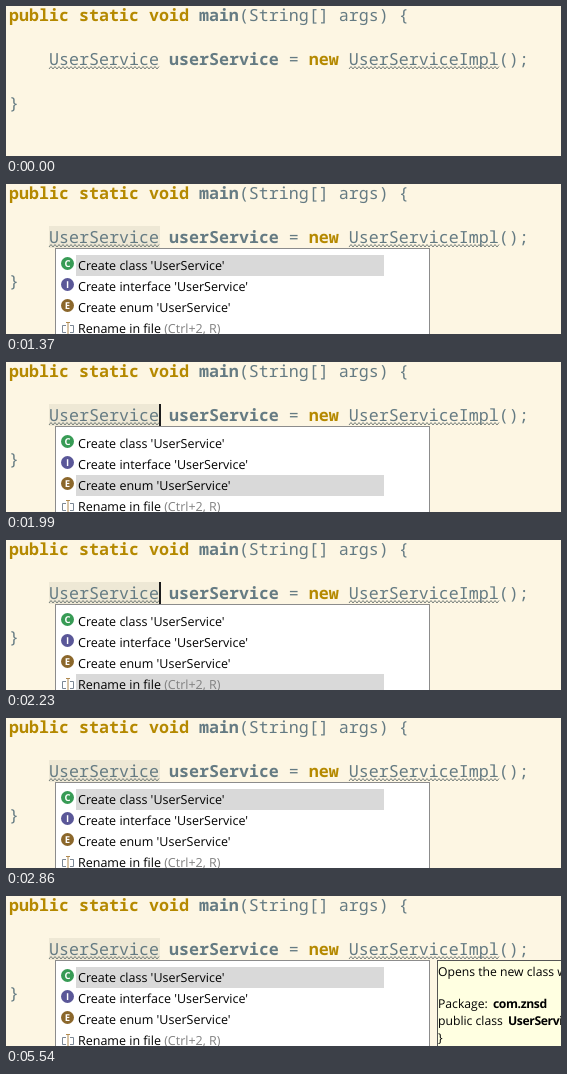
These frames come from a looping animation (555 by 150 pixels, 5.7 s). An HTML page:

```html
<!DOCTYPE html>
<html lang="en">
<head>
<meta charset="utf-8">
<title>Quick fix popup</title>
<style>
  html, body { margin: 0; width: 100%; height: 100%; overflow: hidden; background: #fdf6e3; }
  svg { display: block; }
  text { white-space: pre; text-rendering: geometricPrecision; }
  .code { font: 16.667px "Noto Sans Mono", monospace; fill: #657b83; }
  .code .b { font-weight: 700; }
  .code .k { font-weight: 700; fill: #b58900; }
  .ui { font: 12.5px "Open Sans", sans-serif; fill: #000; }
  .doc { font: 12.2px "Open Sans", sans-serif; fill: #000; }
  .doc .b { font-weight: 700; letter-spacing: -.4px; }
  .letter { font: bold 9.5px "Open Sans", sans-serif; fill: #fff; text-anchor: middle; }
  .wave { fill: none; stroke: #77807c; stroke-width: 1; }
</style>
</head>
<body>
<svg width="555" height="150" viewBox="0 0 555 150">
  <rect id="mark" x="43" y="42" width="111" height="22" fill="#eee8d5"/>
  <g class="code">
    <text x="3" y="15"><tspan class="k">public static void</tspan> <tspan class="b">main</tspan>(String[] args) {</text>
    <text x="43" y="59">UserService <tspan class="b">userService</tspan> = <tspan class="k">new</tspan> UserServiceImpl();</text>
    <text x="3" y="103">}</text>
  </g>
  <path class="wave" id="waves"/>
  <rect id="caret" x="153" y="42" width="2" height="22" fill="#1c1c1c"/>

  <g id="menu">
    <rect x="49.5" y="64.5" width="374" height="100" fill="#fff" stroke="#8c8c8c"/>
    <rect id="bar" x="70" width="308" height="21" fill="#d9d9d9"/>
    <g id="rows"></g>
    <g fill="none" stroke="#7b8794">
      <path d="M60 141.500H56.500V148.500H60M64 141.500H67.500V148.500H64"/>
      <path d="M60 138.500H64M62 138.500V151" stroke="#b08a50"/>
    </g>
    <text class="ui" x="72" y="149">Rename in file <tspan fill="#808080">(Ctrl+2, R)</tspan></text>
  </g>

  <g id="doc" class="doc">
    <rect x="431.500" y="64.500" width="140" height="100" fill="#ffffe1" stroke="#555"/>
    <text x="432" y="80">Opens the new class wizard</text>
    <text x="432" y="112">Package: <tspan class="b" x="487">com.znsd</tspan></text>
    <text x="432" y="129">public class <tspan class="b" x="502">UserService</tspan> {</text>
    <text x="432" y="146">}</text>
  </g>
</svg>
<script>
const LOOP = 5700, MENU = 1370, DOC = 3390, ROW = 21;
const blinks = [820, 1370, 1910, 2380, 2930, 3470, 4010, 4530, 5010, 5540];
const picks = [[1370, 0], [1760, 1], [1990, 2], [2230, 3], [2470, 2], [2700, 1], [2860, 0]];
const $ = id => document.getElementById(id);
const show = (id, on) => $(id).setAttribute('visibility', on ? 'visible' : 'hidden');

// Zigzag underline between two x positions
const wave = (x0, x1) => {
  let d = `M${x0} 63`;
  for (let x = x0 + 2, up = true; x <= x1; x += 2, up = !up) d += `L${x} ${up ? 60.5 : 63}`;
  return d;
};
$('waves').setAttribute('d', wave(43, 153) + wave(343, 493));

$('rows').innerHTML = [['class', 'C', '#379b55'], ['interface', 'I', '#5a5798'], ['enum', 'E', '#8b672b']]
  .map(([kind, letter, color], i) => `
    <circle cx="61.5" cy="${79.5 + i * ROW}" r="6.5" fill="${color}"/>
    <text class="letter" x="61.5" y="${83 + i * ROW}">${letter}</text>
    <text class="ui" x="72" y="${86 + i * ROW}">Create ${kind} 'UserService'</text>`).join('');

function draw(now) {
  const t = now % LOOP;
  const pick = picks.filter(([at]) => at <= t).pop() || picks[0];
  show('mark', t >= blinks[0]);
  show('caret', blinks.filter(at => at <= t).length % 2);
  show('menu', t >= MENU);
  show('doc', t >= DOC);
  $('bar').setAttribute('y', 71 + pick[1] * ROW);
  requestAnimationFrame(draw);
}
draw(0);
</script>
</body>
</html>
```
